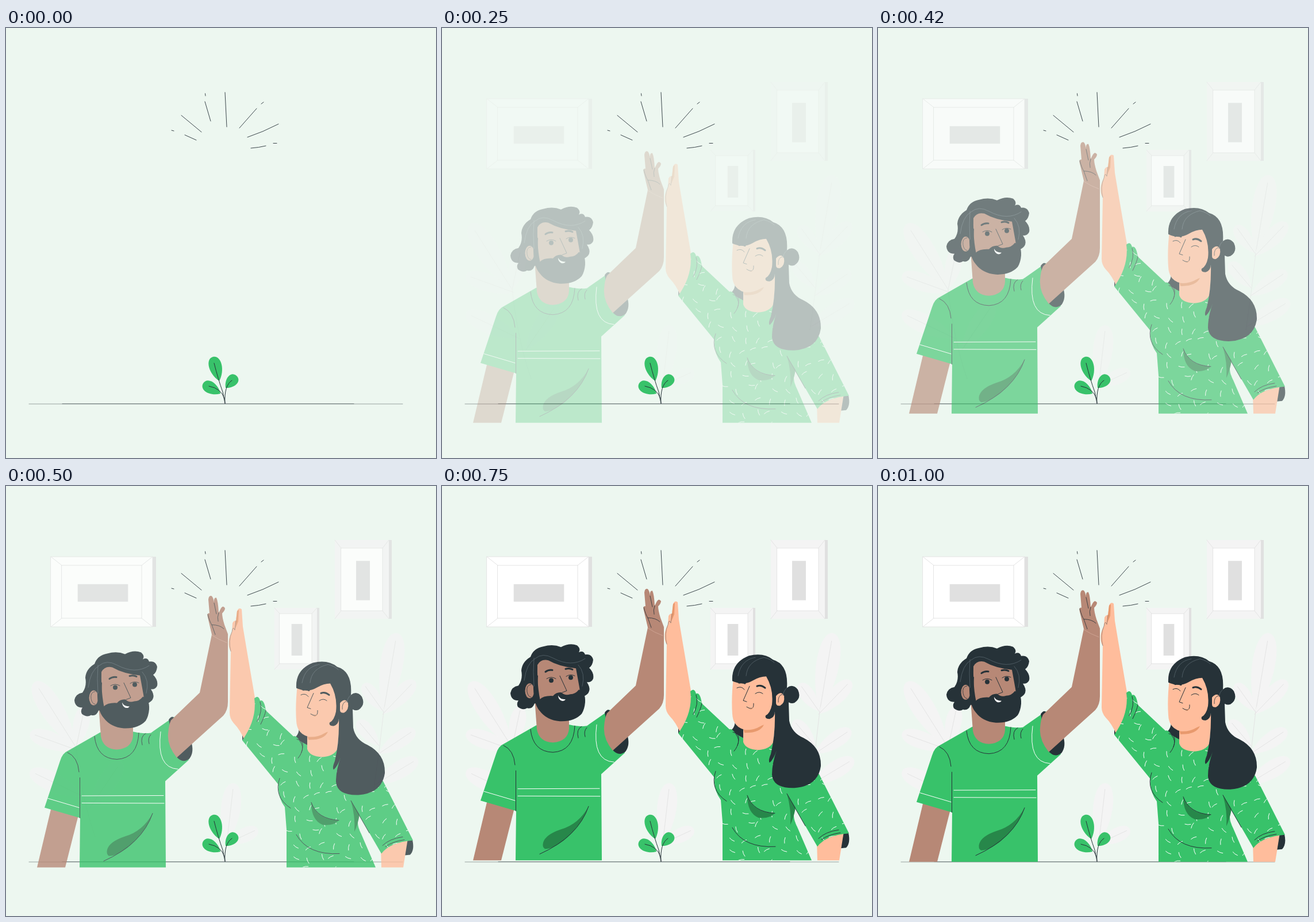
These frames come from a looping animation (748x748 px, 1.04 s). An HTML page:

```html
<!DOCTYPE html>
<html lang="en">
<head>
<meta charset="utf-8">
<title>High five</title>
<style>
html, body { margin: 0; height: 100%; overflow: hidden; background: #edf7f0 }
svg { display: block; width: 100%; height: 100% }
path { stroke-linecap: round; stroke-linejoin: round }
.ink { fill: #263238 }
.green { fill: #38c26a }
.shade { fill: #27874a }
.tan { fill: #b78876 }
.peach { fill: #ffbd9c }
.coral { fill: #e8996d }
.pale { fill: #f4f4f4 }
.grey { fill: #e0e0e0 }
.white { fill: #fff }
.line { fill: none; stroke: #263238 }
.thick { stroke-width: 3 }
.vein { fill: none; stroke: #e4e4e4 }
.chalk { fill: none; stroke: #fff }
.lock { fill: none; stroke: #56646b; stroke-width: .8 }
</style>
</head>
<body>
<svg viewBox="0 0 748 748">
  <g id="room"></g>

  <path class="line" d="M40 654H690" stroke-width=".8" opacity=".55"/>
  <path class="line" d="M98 653.600H605" opacity=".5"/>

  <g id="pair">
    <!-- Man: lowered arm, shirt, raised arm -->
    <path class="tan" d="M79 548L126 562L103 653H54z"/>
    <path class="green" d="M164 418L108 450Q98 454 94 468L67 549L129 567L128 653H278L277 503L318 466L292 391L252 419Q240 421 222 417z"/>
    <path class="ink" d="M283 396Q290 386 294 396L322 434Q328 452 319 464Q307 473 296 460z"/>
    <path class="tan" d="M287 397L337 349L358 248L351 218Q349 210 354 211L352 187Q353 179 358 181Q361 184 362 193Q361 183 366 184Q369 190 370 210L373 204Q377 196 381 202Q381 206 376 211Q376 218 380 231L386 247V365Q386 380 378 389L297 462Q280 441 282 420Q283 405 287 397z"/>
    <path class="line" stroke-width=".8" d="M351 213Q354 225 358 231L364 248M362 193L366 212M370 210Q367 218 369 225M358 231Q372 231 379 238"/>
    <path fill="none" stroke="#d3a998" stroke-width=".8" d="M358 249Q370 257 384 262"/>
    <path class="chalk" d="M269 417Q261 480 299 482M132 528.500L274 528M132 541L275 541.500M73 533L127 549"/>
    <path class="line" d="M107 453Q125 461 127 487M128.500 497V567M154 425Q158 464 193 465Q229 463 231 419M237 440Q233 425 243 420M249 438Q246 428 252 422"/>
    <path class="shade" d="M255 559Q243 593 211 619Q190 634 179 633Q174 630 176 622Q180 608 207 599Q238 590 255 559z"/>
    <path class="line" d="M255 559Q237 612 170 642"/>

    <!-- Man: head -->
    <path class="tan" d="M161 370L165 425Q169 447 193 448Q219 446 221 424V390z"/>
    <path class="ink" d="M161 380Q157 391 148 388Q141 393 132 386Q129 380 133 375Q120 375 119 362Q121 351 133 349Q141 338 138 323Q139 308 154 299Q159 284 176 281Q193 276 207 282Q222 274 235 279Q242 285 238 291Q246 287 249 295Q260 293 263 304Q262 314 256 318Q265 327 263 337Q260 344 252 343Q263 359 248 367L235 380z"/>
    <path class="tan" d="M166 313Q172 302 185 305Q204 316 233 319L239 352L243 380L175 390Q165 360 166 313z"/>
    <ellipse class="tan" cx="152.500" cy="358" rx="8" ry="13"/>
    <path class="line" stroke-width=".8" d="M155 347Q146 348 148 360Q150 369 155 369"/>
    <path class="ink" d="M159 322L167 332Q165 361 170 373Q177 366 193 367Q199 360 208 361Q214 367 223 364Q232 364 238 356Q250 359 249 378Q248 390 243 398Q230 412 205 411Q182 409 170 393Q158 380 159 345z"/>
    <path class="white" d="M202 366Q205 373 215 373Q212 377 207 375Q202 372 202 366z"/>
    <path class="line" d="M205 332L217 358L209 361M182 337Q190 332 198 337M216 333Q223 328 231 332"/>
    <path class="line thick" d="M180 325Q185 321 192 322M215 320Q222 318 227 321"/>
    <circle class="ink" cx="190" cy="340" r="4"/>
    <circle class="ink" cx="224" cy="335" r="4"/>
    <path class="lock" d="M143 340Q147 310 162 302Q175 291 193 301Q225 318 249 302M237 313Q250 327 244 350M160 301Q158 325 160 350"/>

    <!-- Woman: hair behind, lowered hand, raised arm -->
    <path class="ink" d="M497 430Q510 425 510 409L530 425L526 455z"/>
    <path class="ink" d="M695 607L707 605Q711 623 703 631L693 632z"/>
    <path class="peach" d="M652 620L699 603L691 653H653z"/>
    <path class="ink" d="M411 414L426 424L416 436L411 431z"/>
    <path class="peach" d="M402 207Q405 200 410 204L412 234L418 270L433 358L445 400L415 432Q407 413 396 402Q389 394 389 384L391 277Q386 270 388 256Q390 248 393 243L394 228Q397 223 400 224z"/>
    <path class="coral" d="M402 207L405 205L404 225Q402 230 399 237L400 224z"/>
    <path class="line" stroke-width=".7" d="M400 224L398 240Q395 232 393 243Q386 259 391 277" opacity=".6"/>

    <!-- Woman: dress -->
    <path id="dress" class="green" d="M432 359Q439 352 442 363Q449 360 452 380L500 425Q505 423 511 433L524 440L575 445L656 503L708 606Q668 609 653 629L613 560Q610 578 615 588L643 653H488V587L485 548Q472 530 474 509L411 432Q437 395 432 359z"/>
    <clipPath id="cut"><use href="#dress"/></clipPath>
    <path id="flecks" class="chalk" clip-path="url(#cut)"/>
    <path class="shade" d="M531 540Q541 570 579 571Q570 581 551 579Q531 571 531 540zM600 537L615 561Q612 579 606 591Q608 565 600 537z"/>
    <path class="line" d="M476 498Q465 530 495 550M505 596Q525 632 580 629M531 540Q541 569 579 571M600 537L632 593M442 365Q447 381 437 399M452 380Q450 390 443 404M506 430Q518 432 516 444Q515 455 508 463M511 433Q519 443 514 453M655 615Q667 603 690 600M660 617Q672 608 693 605"/>

    <!-- Woman: head -->
    <path class="peach" d="M524 420V447Q528 460 550 461Q569 460 576 448L582 395z"/>
    <path class="coral" d="M524 424Q542 425 560 417Q553 432 526 431z"/>
    <path class="peach" d="M507 335Q503 370 505 398Q506 421 527 426Q555 428 573 400L590 340L540 315z"/>
    <path class="ink" d="M505 341Q503 309 534 297Q560 291 576 304Q603 312 600 353Q610 345 619 356Q626 371 613 379Q607 381 603 378L604 410Q608 431 629 440Q660 456 659 489Q654 524 613 527Q576 528 574 504Q574 484 582 462Q577 477 570 483Q567 480 572 468Q580 435 579 394Q579 404 570 407Q561 407 563 401Q571 397 574 382Q577 355 564 333Q553 333 541 340Q524 350 505 341z"/>
    <path class="peach" d="M581 367Q590 357 595 367Q597 379 588 384Q581 385 581 379z"/>
    <path class="line" stroke-width=".8" d="M592 364Q584 366 585 378"/>
    <path class="lock" d="M515 332Q520 304 545 300M529 332Q531 307 560 300Q572 303 578 309M600 353Q594 358 593 366"/>
    <path class="line" d="M513 353Q521 349 526 356M545 363Q552 358 558 363M535 350L524 375L530 377M530 386Q543 394 542 380"/>
    <path class="line thick" d="M517 344Q522 342 527 345M548 350Q555 347 562 353"/>
    <path class="coral" d="M533 389Q539 391 541 386Q540 393 533 389z"/>
  </g>

  <g id="sprout"></g>
  <path class="line" d="M362 583Q369 611 377 633L381 653M353 623Q375 627 380 645M393 613Q379 622 381 653"/>

  <!-- Burst -->
  <path class="line" stroke-width=".9" d="M305 152L340 181M346 128L356 162M381 112L384 172M436 140L406 174M474 167Q447 181 420 190M311 186L331 195M426 209Q440 208 452 205M346.500 114L347 118M444 132L448 129M288 178L292 179M465 200.500H471"/>
</svg>
<script>
const el = id => document.getElementById(id);
const room = el('room'), pair = el('pair'), sprout = el('sprout');

function path(parent, cls, d) {
  const node = document.createElementNS('http://www.w3.org/2000/svg', 'path');
  node.setAttribute('class', cls);
  node.setAttribute('d', d);
  parent.append(node);
}
const box = (x, y, w, h) => `M${x} ${y}h${w}v${h}h${-w}z`;

// Wall picture: rim, mat inset by (dx, dy), slightly off-centre core, shaded side
function picture(x, y, w, h, dx, dy, side, rim) {
  const mw = w - 2 * dx, mh = h - 2 * dy;
  const cw = mw * (w > h ? .63 : .333), ch = mh * (w > h ? .333 : .63);
  path(room, 'grey', box(x + w - 1, y, side + 1, h));
  path(room, rim, box(x, y, w, h));
  path(room, 'white', box(x + dx, y + dy, mw, mh));
  path(room, 'vein', box(x + dx, y + dy, mw, mh) +
    `M${x} ${y}l${dx} ${dy}m${mw} 0l${dx} ${-dy}m0 ${h}l${-dx} ${-dy}m${-mw} 0l${-dx} ${dy}`);
  path(room, 'grey', box(x + (w - cw) / 2 + 2, y + (h - ch) / 2 + 2, cw, ch));
}

// Round-tipped leaf from base (x, y) to tip (u, v), wider when longer
function leaf(parent, cls, x, y, u, v) {
  const dx = u - x, dy = v - y, len = Math.hypot(dx, dy), w = 10 + .13 * len;
  const at = (along, across) =>
    `${x + dx * along - dy / len * w * across} ${y + dy * along + dx / len * w * across} `;
  path(parent, cls, `M${x} ${y}C${at(.4, 1)}${at(1, .9)}${u} ${v}C${at(1, -.9)}${at(.4, -1)}${x} ${y}`);
  if (parent === room) path(parent, 'vein', `M${x} ${y}L${at(.9, 0)}`);
}
const frond = (...ends) => ends.forEach(end => leaf(room, 'pale', ...end));

picture(78, 123, 177, 122, 19, 15, 6, 'white');
path(room, 'vein', box(78, 123, 177, 122));
picture(572, 94, 94, 137, 11, 14, 5, 'pale');
picture(467, 212, 74, 107, 9, 10, 4, 'pale');

frond([122, 455, 50, 341], [125, 460, 42, 430], [134, 540, 42, 496], [122, 455, 137, 384], [146, 560, 200, 480]);
frond([657, 392, 680, 256], [655, 397, 711, 339], [648, 466, 711, 424], [641, 520, 716, 475],
  [656, 392, 622, 344], [649, 452, 612, 408]);
frond([384, 622, 396, 517], [384, 622, 438, 597]);
path(room, 'vein', 'M122 455Q132 545 155 610M657 392Q650 460 640 525');

leaf(sprout, 'green', 371, 614, 360, 572);
leaf(sprout, 'green', 373, 636, 343, 618);
leaf(sprout, 'green', 382, 626, 401, 605);

// Flecks scattered on a jittered grid, clipped to the dress
let seed = 7;
const rand = () => (seed = seed * 16807 % 2147483647) / 2147483647;
const GAP = 22;
let flecks = '';
for (let y = 365; y < 655; y += GAP) {
  for (let x = 412; x < 710; x += GAP) {
    const a = rand() * Math.PI, dx = 5 * Math.cos(a), dy = 5 * Math.sin(a);
    flecks += `M${x + rand() * 12} ${y + rand() * 12}q${dx - dy * .3} ${dy + dx * .3} ${2 * dx} ${2 * dy}`;
  }
}
el('flecks').setAttribute('d', flecks);

// Cubic bezier easing (.36, -.01, .5, 1.38), solved by bisection
const curve = (s, a, b) => 3 * (1 - s) ** 2 * s * a + 3 * (1 - s) * s * s * b + s ** 3;
function ease(x) {
  if (x >= 1) return 1;
  let lo = 0, hi = 1;
  for (let i = 0; i < 24; i++) {
    const mid = (lo + hi) / 2;
    if (curve(mid, .36, .5) < x) lo = mid; else hi = mid;
  }
  return curve(lo, -.01, 1.38);
}

const LOOP = 1040, FPS = 24, RISE = 44.9, REST = .7;
function draw() {
  const t = performance.now() % LOOP;
  const step = Math.floor((Math.floor(t / 10) * 10 + 4) * FPS / 1000);
  const p = step < 4 ? 0 : ease((step + .5) / FPS);
  for (const group of [room, pair]) group.setAttribute('opacity', Math.min(1, p));
  pair.setAttribute('transform', `translate(0 ${REST + RISE * (1 - p)})`);
  requestAnimationFrame(draw);
}
draw();
</script>
</body>
</html>
```
